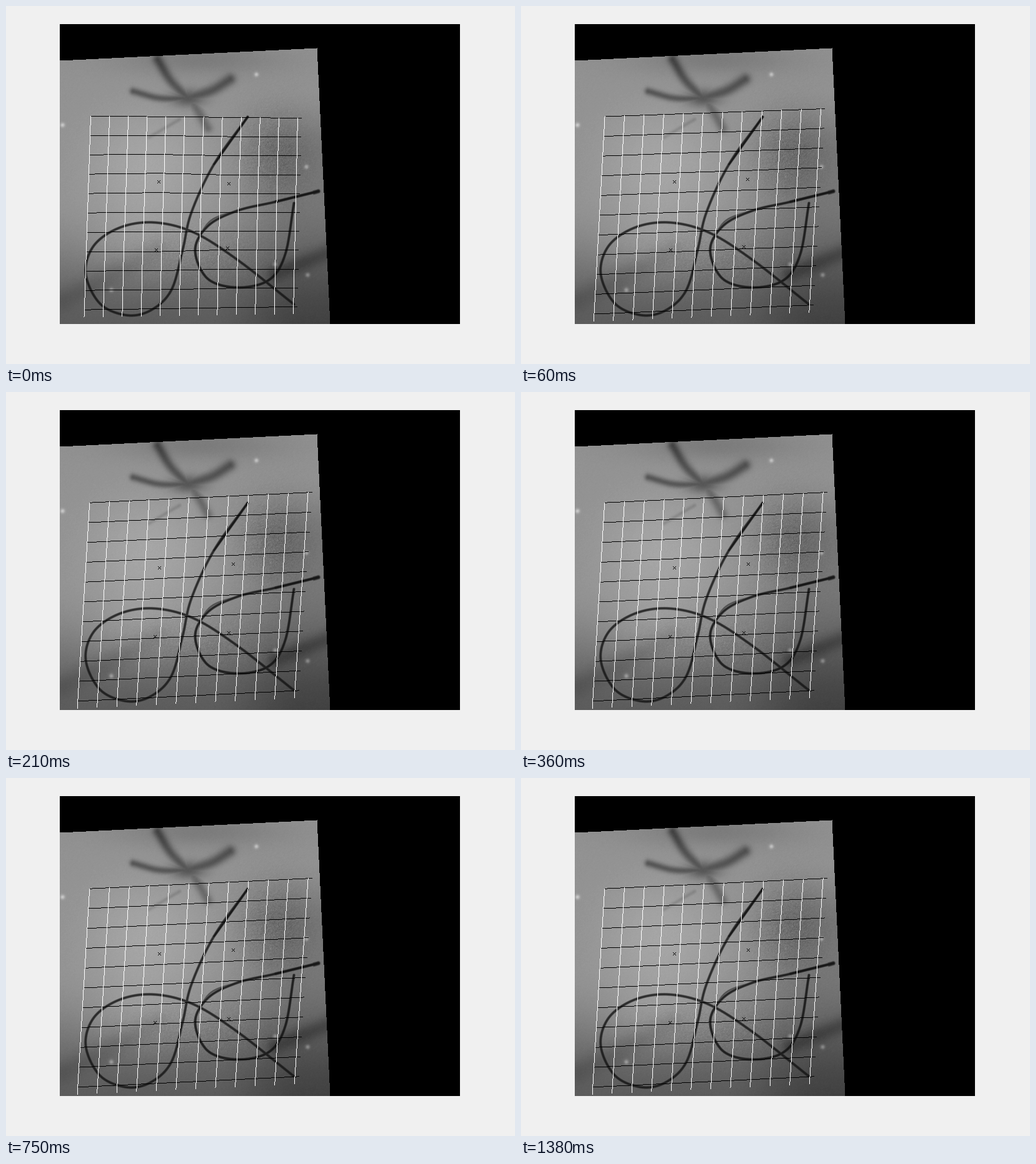
These frames come from a looping animation (814 by 573 pixels, 1.47 s). A matplotlib script:

```python
import numpy as np
import matplotlib.pyplot as plt
from matplotlib.animation import FuncAnimation

W, H, DPI = 814, 573, 64
FRAMES, STEP = 49, 30
X0, Y0, X1, Y1 = 86, 29, 726, 509  # picture area
PATCH_W = 434  # widest part of the tissue patch

xx, yy = np.meshgrid(np.arange(X0, X0 + PATCH_W, dtype=float),
                     np.arange(Y0, Y1, dtype=float))


def spline(points, n):
    """Catmull-Rom curve through the points."""
    p = np.array(points, float)
    p = np.vstack([2 * p[0] - p[1], p, 2 * p[-1] - p[-2]])
    t = np.linspace(0, 1, n, endpoint=False)[:, None]
    out = [b + t / 2 * (c - a + t * (2 * a - 5 * b + 4 * c - d + t * (3 * (b - c) + d - a)))
           for a, b, c, d in zip(p, p[1:], p[2:], p[3:])]
    return np.vstack(out + [p[-2:-1]])


def stroke(points, width, power=2, n=14):
    """Soft cover, 0 to 1, of a curved line."""
    curve = spline(points, n)
    best = np.full(xx.shape, 1e9)
    for (ax_, ay), (bx, by) in zip(curve, curve[1:]):
        dx, dy = bx - ax_, by - ay
        t = np.clip(((xx - ax_) * dx + (yy - ay) * dy) / (dx * dx + dy * dy), 0, 1)
        np.minimum(best, (xx - ax_ - t * dx) ** 2 + (yy - ay - t * dy) ** 2, out=best)
    return np.exp(-(np.sqrt(best) / width) ** power)


def blob(x, y, rx, ry):
    return np.exp(-((xx - x) / rx) ** 2 - ((yy - y) / ry) ** 2)


def ramp(v, lo, hi):
    t = np.clip((v - lo) / (hi - lo), 0, 1)
    return t * t * (3 - 2 * t)


def tissue():
    img = 146 - 54 * ramp(yy, 300, 520) - 26 * ramp(xx, 320, 480) * ramp(yy, 130, 240)
    img += 20 * blob(225, 255, 95, 90) + 18 * blob(215, 385, 85, 55)
    img -= 18 * blob(435, 235, 50, 70) + 22 * blob(310, 85, 130, 25)

    star = (290, 147)
    arms = [
        stroke([(203, 136), (245, 147), star], 6, n=5),
        stroke([(242, 85), (262, 118), star], 8, n=5),
        stroke([star, (328, 135), (358, 117)], 9, n=5),
        stroke([star, (305, 165), (322, 195)], 8, n=5) * 0.7,
        blob(*star, 28, 14),
    ]
    img -= 62 * np.max(arms, axis=0)
    img -= 20 * stroke([(228, 210), (277, 181)], 3, n=3)
    img -= 14 * stroke([(90, 470), (160, 435), (240, 390)], 18, n=5)
    img -= 28 * stroke([(430, 428), (520, 392)], 14, n=3)

    noise = np.random.default_rng(4).normal(size=img.shape)
    noise += np.roll(noise, 1, 0) + np.roll(noise, 1, 1)
    return img + noise * (0.5 + 3 * blob(425, 240, 50, 70) + 2 * blob(310, 400, 110, 45))


def add_glints(img):
    for x, y in [(400, 109), (480, 257), (482, 430), (430, 413), (90, 190), (168, 454)]:
        img += 55 * blob(x, y, 3.5, 3.5)


def add_threads(img):
    long_loop = [(386, 177), (332, 253), (296, 330), (282, 390), (264, 454), (232, 486),
                 (193, 494.5), (150, 476), (127, 428), (140, 383), (182, 354),
                 (237, 346), (300, 362), (370, 406), (460, 477)]
    short_loop = [(499, 296), (430, 313), (370, 327), (323, 351), (302, 390),
                  (322, 436), (370, 450), (420, 438), (446, 397), (460, 315)]
    cover = np.max([
        0.8 * stroke(long_loop, 2.1, 4),
        0.85 * stroke(short_loop, 2.1, 4),
        0.95 * stroke(long_loop[:2], 2.1, 4),
        0.95 * stroke(short_loop[:2], 2.3, 4),
        0.9 * stroke([(499, 296), (492, 298)], 3.2, 4),
        0.5 * stroke([(375, 325), (330, 341), (308, 368)], 1.5, 4),
    ], axis=0)
    img += cover * (18 - img)


def make_stage():
    img = tissue()
    add_glints(img)
    add_threads(img)
    top = 87 - (xx - 86) * 20 / 411
    right = 497 + (yy - 67) * 21 / 442
    img[(yy < top) | (xx > right)] = 0
    stage = np.full((H, W), 240.0)
    stage[Y0:Y1, X0:X1] = 0
    stage[Y0:Y1, X0:X0 + PATCH_W] = img
    return np.clip(stage, 0, 255).astype(np.uint8)


# Mesh: a 4 x 4 lattice of control points, linear inside each cell.
U_MAX, V_MAX, GAP, DECAY = 336, 311, 30, 0.46
THIRDS = np.arange(4) / 3


def lattice(tl, tr, bl, br):
    tl, tr, bl, br = (np.array(c, float) for c in (tl, tr, bl, br))
    u, v = THIRDS[None, :, None], THIRDS[:, None, None]
    return (1 - v) * ((1 - u) * tl + u * tr) + v * ((1 - u) * bl + u * br)


START = lattice((135, 175.6), (472, 179), (124.5, 497), (465, 492))
START[1:3, 1:3] = [[(244, 281), (356, 284)], [(240, 390), (354, 387)]]
END = lattice((133.2, 176.7), (489, 160), (113.5, 506), (467, 489))


def warp(ctrl, u, v):
    """Map mesh coordinates to the stage."""
    u, v = np.broadcast_arrays(3.0 * u / U_MAX, 3.0 * v / V_MAX)
    i, j = np.minimum(u.astype(int), 2), np.minimum(v.astype(int), 2)
    a, b = (u - i)[:, None], (v - j)[:, None]
    return ((1 - b) * ((1 - a) * ctrl[j, i] + a * ctrl[j, i + 1])
            + b * ((1 - a) * ctrl[j + 1, i] + a * ctrl[j + 1, i + 1]))


def trace(along, across):
    """Pixels of a thin polyline: one per step of its main axis."""
    a = np.arange(round(along[0]), round(along[-1]) + 1)
    return a, np.rint(np.interp(a, along, across)).astype(int)


stage = make_stage()
fig = plt.figure(figsize=(W / DPI, H / DPI), dpi=DPI, facecolor="#f0f0f0")
ax = fig.add_axes([0, 0, 1, 1])
ax.axis("off")
picture = ax.imshow(stage, cmap="gray", vmin=0, vmax=255, extent=(0, W, H, 0),
                    interpolation="nearest", aspect="auto")


def draw(frame):
    ctrl = END + (START - END) * DECAY ** frame
    img = stage.copy()
    for v in range(0, V_MAX, GAP):
        px, py = trace(*warp(ctrl, THIRDS * U_MAX, v).T)
        img[py, px] = 0
    for u in range(0, U_MAX, GAP):
        py, px = trace(*warp(ctrl, u, THIRDS * V_MAX).T[::-1])
        img[py, px] = 255
    arm = np.arange(-2, 3)
    for x, y in np.rint(ctrl[1:3, 1:3].reshape(-1, 2)).astype(int):
        img[y + arm, x + arm] = img[y + arm, x - arm] = 0
    picture.set_data(img)
    return picture,


anim = FuncAnimation(fig, draw, frames=FRAMES, interval=STEP, repeat=True,
                     repeat_delay=0, blit=False)
plt.show()
```
